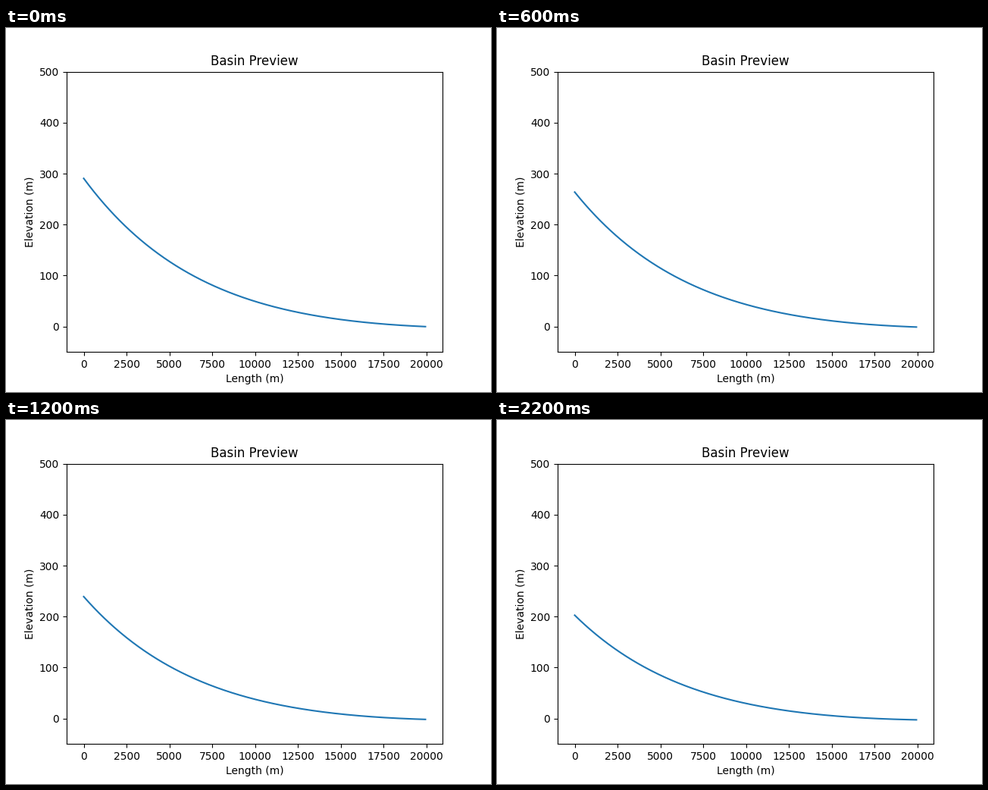
A matplotlib script that plays this animation: 640 px wide and 480 px high, repeating every 2.4 s.

```python
import numpy as np
import matplotlib.pyplot as plt
from matplotlib.animation import FuncAnimation

FRAMES = 12
INTERVAL = 200    # ms
RETREAT = 205.0   # metres the profile moves upstream per step

x = np.arange(0, 20000, 50)


def profile(dist):
    """Concave river profile: exponential fall plus a slight linear term."""
    return 345.4 * np.exp(-1.3664e-4 * dist) + 0.0016 * dist - 54.8


fig, ax = plt.subplots(figsize=(6.4, 4.8), dpi=100)
line, = ax.plot(x, profile(x))
ax.set_ylim(-50, 500)
ax.set_title("Basin Preview")
ax.set_xlabel("Length (m)")
ax.set_ylabel("Elevation (m)")


def update(step):
    line.set_ydata(profile(x + RETREAT * step))
    return line,


anim = FuncAnimation(fig, update, frames=FRAMES, interval=INTERVAL,
                     repeat=True, repeat_delay=0)
plt.show()
```
